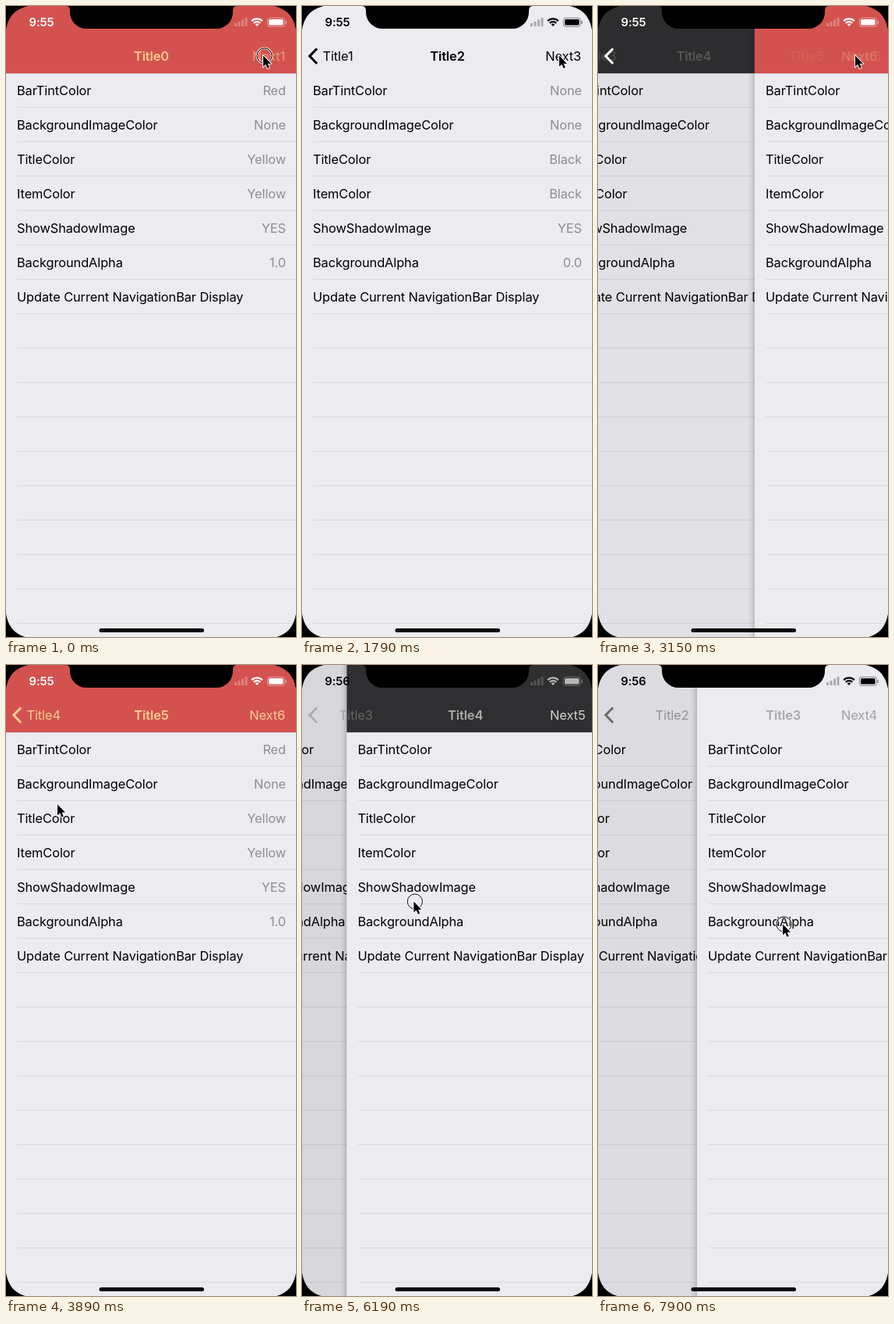
Recreate the animation shown at these times as an HTML page with a canvas. Size 372x807 px, loop 8 s.

```html
<!DOCTYPE html>
<html lang="en">
<head>
<meta charset="utf-8">
<title>Navigation bar demo</title>
<style>
html, body { margin: 0; width: 372px; height: 807px; overflow: hidden; background: #000; }
canvas { display: block; width: 372px; height: 807px; }
</style>
</head>
<body>
<canvas id="stage" width="372" height="807"></canvas>
<script>
const W = 372, H = 807, BAR = 86, LOOP = 8000;
const c = document.getElementById('stage').getContext('2d');
const FONT = 'Inter, Roboto, sans-serif';

const red = { bar: '#d3524f', tint: '#f8cd92', status: '#fff', values: ['Red', 'None', 'Yellow', 'Yellow', 'YES', '1.0'] };
const clear = { bar: null, tint: '#000', status: '#000', values: ['None', 'None', 'Black', 'Black', 'YES', '0.0'] };
const gray = { bar: '#2f2f31', tint: '#fff', status: '#fff', values: ['Gray', 'None', 'White', 'White', 'YES', '1.0'] };
const pages = [red, red, clear, clear, gray, red];
const labels = ['BarTintColor', 'BackgroundImageColor', 'TitleColor', 'ItemColor',
  'ShowShadowImage', 'BackgroundAlpha', 'Update Current NavigationBar Display'];

// Pushes: start, duration. Pops: press, release (page follows the pointer in between).
const pushes = [[500, 600], [1290, 480], [1970, 500], [2570, 450], [3060, 470]];
const pops = [[4030, 4500], [5720, 6600], [7400, 9000]];
const SETTLE = 260;
// Pointer path: time, x, y
const path = [
  [0, 331.5, 63.5], [3600, 331.5, 63.5], [3860, 67.5, 178], [4030, 67.5, 180], [4500, 270, 240],
  [4750, 290, 250], [5220, 52.5, 290], [5600, 86, 292], [5720, 87.5, 296], [6190, 144.5, 302.5],
  [6600, 300, 312], [6850, 310, 315], [7300, 111.5, 322], [7400, 111.5, 325], [7900, 238.5, 331.5], [8000, 238.5, 331.5]
];

const clamp = v => Math.max(0, Math.min(1, v));
const rawSpring = u => 1 - (1 + 8 * u) * Math.exp(-8 * u);
const spring = u => rawSpring(u) / rawSpring(1);

function pointer(t) {
  const i = Math.max(1, path.findIndex(k => k[0] >= t));
  const [a, b] = [path[i - 1], path[i]];
  const u = clamp((t - a[0]) / (b[0] - a[0]));
  return [a[1] + (b[1] - a[1]) * u, a[2] + (b[2] - a[2]) * u];
}

// Current page, or the pair (low, low + 1) with the upper page at x
function stateAt(t) {
  let page = 0;
  for (const [start, length] of pushes) {
    if (t < start) return { page };
    if (t < start + length) return { low: page, x: W * (1 - spring((t - start) / length)), push: true };
    page++;
  }
  for (const [press, release] of pops) {
    if (t < press) return { page };
    if (t < release + SETTLE) {
      let x = pointer(Math.min(t, release))[0] - pointer(press)[0];
      if (t > release) x += (W - x) * (1 - (1 - (t - release) / SETTLE) ** 2);
      return { low: page - 1, x };
    }
    page--;
  }
  return { page };
}

function text(s, x, y, color, { align = 'left', alpha = 1, weight = 400, size = 16.4 } = {}) {
  if (alpha < 0.01) return;
  c.globalAlpha = alpha;
  c.font = `${weight} ${size}px ${FONT}`;
  c.letterSpacing = '-0.1px';
  c.textAlign = align;
  c.fillStyle = color;
  c.fillText(s, x, y);
  c.globalAlpha = 1;
}

function rect(x, y, w, h, color) {
  c.fillStyle = color;
  c.fillRect(x, y, w, h);
}

function drawBar(page) {
  if (!page.bar) return;
  rect(0, 0, W, BAR, page.bar);
  rect(0, BAR, W, 0.5, '#b5a9ad');
}

function drawPage(i, x) {
  const page = pages[i];
  c.save();
  c.translate(x, 0);
  rect(0, 0, W + 120, H, '#ebebf0');
  drawBar(page);
  for (let k = 0; k < 16; k++) {
    const y = BAR + 44 * k;
    rect(14.5, y + 43, W, 1, '#d9d9dd');
    if (labels[k]) text(labels[k], 14, y + 28, '#000');
    if (page.values[k]) text(page.values[k], 359, y + 28, '#8e8e93', { align: 'right' });
  }
  c.restore();
}

function chevron(color, alpha) {
  c.globalAlpha = alpha;
  c.strokeStyle = color;
  c.lineWidth = 3;
  c.beginPath();
  c.moveTo(19.2, 54.5);
  c.lineTo(9.8, 64.1);
  c.lineTo(19.2, 73.7);
  c.stroke();
  c.globalAlpha = 1;
}

const title = (i, x, alpha) => text('Title' + i, x, 70, pages[i].tint, { align: 'center', weight: 600, alpha });
const back = (i, x, color, alpha) => text('Title' + i, x, 70, color, { alpha });
const next = (i, alpha, dx = 0) => text('Next' + (i + 1), 358 + dx, 70, pages[i].tint, { align: 'right', alpha });

function drawItems(i, t) {
  title(i, 186.5, 1);
  if (i) {
    chevron(pages[i].tint, 1);
    back(i - 1, 26.5, pages[i].tint, 1);
  }
  const pressed = pushes.some(([s]) => t >= s - 90 && t < s);
  next(i, t < 500 ? 0.6 : pressed ? 0.2 : 1);
}

function drawMovingItems({ low, x, push }) {
  const p = x / W, q = 1 - p, up = low + 1;
  const same = pages[low].tint === pages[up].tint;
  const tint = same || push ? pages[up].tint : '#888';
  title(low, 186.5 - 138 * q, p ** 3);
  title(up, 186.5 + 150 * p, q ** 3);
  back(low, 26.5 + 138 * p, tint, q ** 3);
  if (low) {
    back(low - 1, 26.5 - 100 * q, pages[low].tint, p ** 3);
    chevron(push && p > 0.5 ? pages[low].tint : tint, push ? 1 : 0.5);
  } else chevron(tint, q);
  next(low, push ? 0.15 * p : p ** 3, push ? 5.5 : 0);
  next(up, same ? q ** 3 : q ** 1.5, !push && !same ? 5.5 : 0);
}

function drawStatus(clock, timeColor, iconColor, alpha) {
  text(clock, 45.5, 26, timeColor, { align: 'center', weight: 600, size: 14.8 });
  c.fillStyle = c.strokeStyle = iconColor;
  c.globalAlpha = 0.27 * alpha;
  [4, 6, 8.5, 11].forEach((h, k) => c.fillRect(293 + 4.5 * k, 26 - h, 3, h));
  c.globalAlpha = alpha;
  c.lineWidth = 2.3;
  for (const r of [5.9, 9.6]) {
    c.beginPath();
    c.arc(322, 26, r, -Math.PI * 0.75, -Math.PI * 0.25);
    c.stroke();
  }
  c.beginPath();
  c.moveTo(322, 26);
  c.arc(322, 26, 3.4, -Math.PI * 0.75, -Math.PI * 0.25);
  c.fill();
  c.beginPath();
  c.roundRect(337, 17, 18.5, 7.6, 1.5);
  c.fill();
  c.globalAlpha = 0.45 * alpha;
  c.lineWidth = 1;
  c.beginPath();
  c.roundRect(335.3, 15.3, 22, 11, 3);
  c.stroke();
  c.fillRect(358.4, 19, 1.3, 4);
  c.globalAlpha = 1;
}

// Black outside one smooth screen corner at (x, y); sx, sy point inwards
function corner(x, y, sx, sy) {
  c.beginPath();
  c.moveTo(x, y);
  c.lineTo(x, y + 52 * sy);
  c.bezierCurveTo(x, y + 13 * sy, x + 13 * sx, y, x + 52 * sx, y);
  c.fill();
}

function drawDevice() {
  c.fillStyle = '#000';
  // The 375 x 812 screen is slightly larger than the stage
  const left = -1.5, right = 373.5, top = -2, bottom = 810;
  corner(left, top, 1, 1);
  corner(right, top, -1, 1);
  corner(left, bottom, 1, -1);
  corner(right, bottom, -1, -1);
  c.beginPath();
  c.moveTo(77, 0);
  c.quadraticCurveTo(82, 0, 82, 6);
  c.arcTo(82, 29, 103, 29, 21);
  c.arcTo(291, 29, 291, 8, 21);
  c.lineTo(291, 6);
  c.quadraticCurveTo(291, 0, 296, 0);
  c.fill();
  c.beginPath();
  c.roundRect(119.5, 796, 134.5, 5, 2.5);
  c.fill();
}

function drawPointer(t) {
  const [x, y] = pointer(t);
  const clicking = t < 60 || pushes.slice(1).some(([s]) => t >= s - 120 && t < s - 50)
    || pops.some(([a, b]) => t >= a && t < b);
  if (clicking) {
    c.beginPath();
    c.arc(x, y, 9.6, 0, 7);
    c.strokeStyle = 'rgba(255,255,255,.8)';
    c.lineWidth = 2.6;
    c.stroke();
    c.strokeStyle = '#000';
    c.lineWidth = 1;
    c.stroke();
  }
  c.save();
  c.translate(x - 1.5, y);
  c.beginPath();
  [[0, 0], [0, 14], [3.2, 11], [5.5, 16.2], [7.8, 15.2], [5.6, 10.2], [10, 10.2]].forEach(p => c.lineTo(...p));
  c.closePath();
  c.strokeStyle = '#fff';
  c.lineWidth = 1.8;
  c.stroke();
  c.fillStyle = '#000';
  c.fill();
  c.restore();
}

function drawShadow(x) {
  const shade = c.createLinearGradient(x - 9, 0, x, 0);
  shade.addColorStop(0, 'rgba(0,0,0,0)');
  shade.addColorStop(0.5, 'rgba(0,0,0,.05)');
  shade.addColorStop(1, 'rgba(0,0,0,.16)');
  rect(x - 9, 0, 9, H, shade);
}

function draw(t) {
  const s = stateAt(t);
  const clock = t < 4540 ? '9:55' : '9:56';
  if (s.page !== undefined) {
    drawPage(s.page, 0);
    drawItems(s.page, t);
    const { status } = pages[s.page];
    drawStatus(clock, status, status, 1);
  } else {
    const low = pages[s.low], up = pages[s.low + 1], q = 1 - s.x / W;
    drawPage(s.low, -0.3 * W * q);
    rect(0, 0, W, H, `rgba(0,0,0,${0.1 * q})`);
    drawShadow(s.x);
    drawPage(s.low + 1, s.x);
    if (low === up) drawBar(up);
    drawMovingItems(s);
    const statusAt = x => (x < s.x ? low : up).status;
    drawStatus(clock, statusAt(45), statusAt(325), s.push || low.status === up.status ? 1 : 0.65);
  }
  drawDevice();
  drawPointer(t);
}

const begin = performance.now();
function tick() {
  draw((performance.now() - begin) % LOOP);
  requestAnimationFrame(tick);
}
tick();
</script>
</body>
</html>
```
